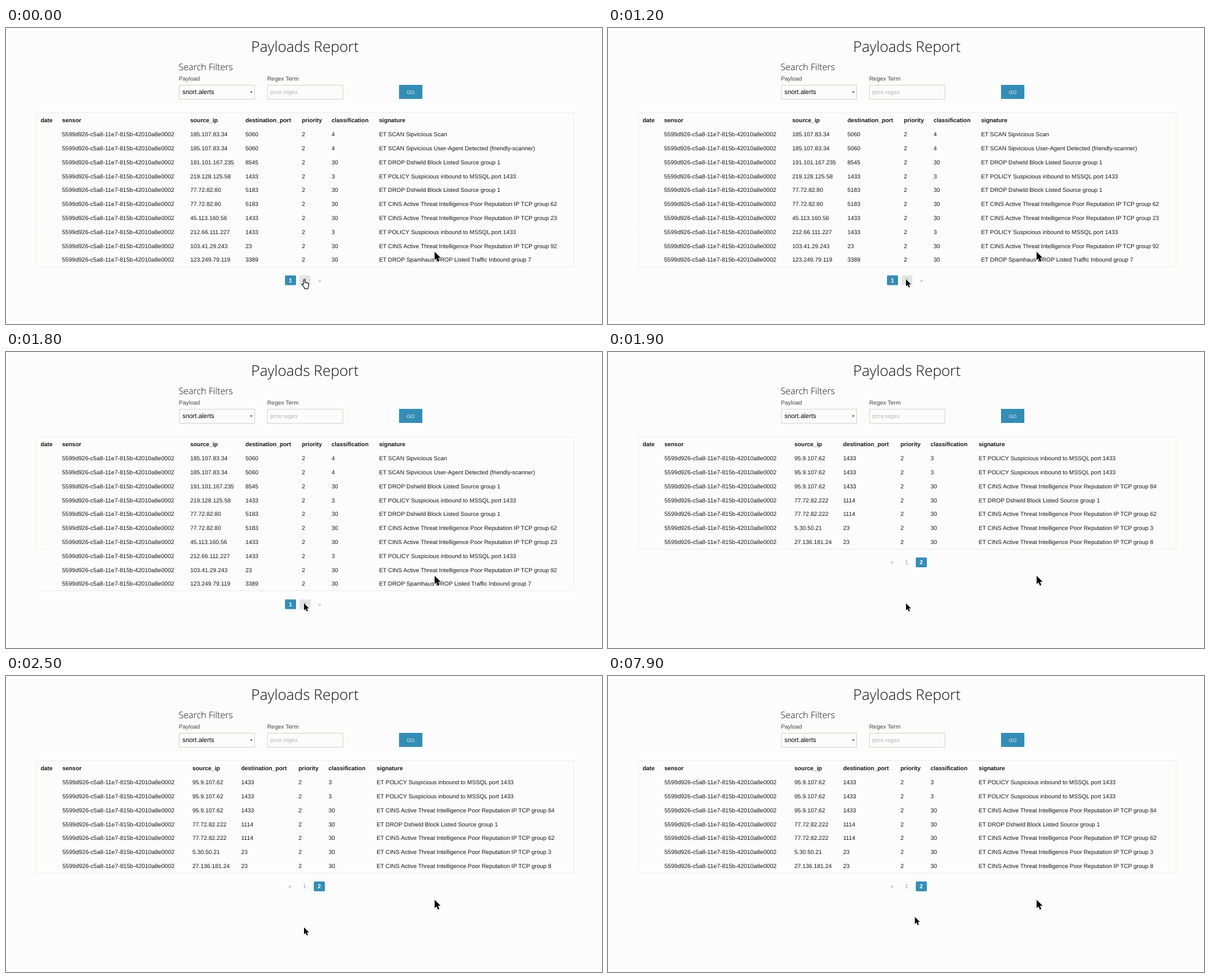
Recreate the animation shown at these times as an HTML page. Size 972 px wide and 484 px high, loop 8000 ms.

```html
<!DOCTYPE html>
<html lang="en">
<head>
<meta charset="utf-8">
<title>Payloads Report</title>
<style>
  html, body { margin: 0; width: 100%; height: 100%; overflow: hidden; background: #fcfcfc; }
  svg { display: block; width: 972px; height: 484px; }
  text { font: 9.5px "Liberation Sans", Arial, sans-serif; fill: #161616; text-rendering: geometricPrecision; white-space: pre; }
  .title { font: 300 24.1px "Open Sans", sans-serif; fill: #0c0c0c; }
  .sub { font: 300 14.75px "Open Sans", sans-serif; fill: #0c0c0c; }
  .label { fill: #444; }
  .select { font-size: 10.5px; fill: #000; }
  .hint { fill: #b4b4b4; }
  .go { font-size: 8px; fill: #eaf4f8; }
  .head { font-weight: bold; }
  .sensor { font-size: 9.65px; }
  .link { fill: #a2a2a0; }
  .on { font-weight: bold; fill: #fff; }
  .mid { text-anchor: middle; }
  .line { fill: none; stroke: #eeeede; }
  .field { fill: none; stroke: #d6d6cc; }
  .blue { fill: #358db6; }
  .hover { fill: #e4e4e4; }
  .cursor { fill: #050505; stroke: #fdfdfd; stroke-width: .8; stroke-linejoin: round; paint-order: stroke; }
</style>
</head>
<body>
<svg id="stage" viewBox="0 0 972 484">
  <defs>
    <path id="arrow" d="M0 0V13.6L3.2 10.7L5.4 15.9L7.7 14.9L5.5 9.8H9.8Z"/>
  </defs>
  <text class="title" x="399.8" y="38.5">Payloads Report</text>
  <text class="sub" x="281.5" y="69">Search Filters</text>
  <text class="label" x="282" y="86">Payload</text>
  <text class="label" x="426" y="86">Regex Term</text>
  <rect class="field" x="282.5" y="93.5" width="123" height="23"/>
  <text class="select" x="287.7" y="108.3">snort.alerts</text>
  <path d="M398 103.8h4l-2 2.2z" fill="#222"/>
  <rect class="field" x="426.5" y="93.5" width="123" height="23"/>
  <text class="hint" x="431" y="108">pcre regex</text>
  <rect class="blue" x="641" y="93" width="38" height="23"/>
  <text class="go mid" x="660" y="107.5">GO</text>
  <g id="page1"></g>
  <g id="page2"></g>
  <use href="#arrow" class="cursor" x="699" y="366"/>
  <use id="pointer" href="#arrow" class="cursor"/>
  <path id="hand" d="M485.2 419.5V413q0-1.6 1.2-1.6t1.2 1.6v3.4q1.4-.9 2.2.3 1.4-.7 2 .5 1.8-.5 1.8 1.4v2.6q0 2-1.2 3.4v1.9h-5.6v-1.8l-3.8-4.4q-.8-1.4.4-1.7 1 0 1.8.9z"
        fill="#fdfdfd" stroke="#111" stroke-width="1.1" stroke-linejoin="round"/>
</svg>
<script>
const LOOP = 8000;
const SENSOR = '5599d926-c5a8-11e7-815b-42010a8e0002';
const HEADS = ['date', 'sensor', 'source_ip', 'destination_port', 'priority', 'classification', 'signature'];
const SQL = 'ET POLICY Suspicious inbound to MSSQL port 1433';
const SHIELD = 'ET DROP Dshield Block Listed Source group 1';
const cins = n => 'ET CINS Active Threat Intelligence Poor Reputation IP TCP group ' + n;

// Row: source ip, port, classification, signature
const first = [
  ['185.107.83.34', 5060, 4, 'ET SCAN Sipvicious Scan'],
  ['185.107.83.34', 5060, 4, 'ET SCAN Sipvicious User-Agent Detected (friendly-scanner)'],
  ['191.101.167.235', 8545, 30, SHIELD],
  ['219.128.125.58', 1433, 3, SQL],
  ['77.72.82.80', 5183, 30, SHIELD],
  ['77.72.82.80', 5183, 30, cins(62)],
  ['45.113.160.56', 1433, 30, cins(23)],
  ['212.66.111.227', 1433, 3, SQL],
  ['103.41.29.243', 23, 30, cins(92)],
  ['123.249.79.119', 3389, 30, 'ET DROP Spamhaus DROP Listed Traffic Inbound group 7']
];
const second = [
  ['95.9.107.62', 1433, 3, SQL],
  ['95.9.107.62', 1433, 3, SQL],
  ['95.9.107.62', 1433, 30, cins(84)],
  ['77.72.82.222', 1114, 30, SHIELD],
  ['77.72.82.222', 1114, 30, cins(62)],
  ['5.30.50.21', 23, 30, cins(3)],
  ['27.136.181.24', 23, 30, cins(8)]
];

const $ = id => document.getElementById(id);

function add(parent, tag, attrs, content = '') {
  const el = document.createElementNS('http://www.w3.org/2000/svg', tag);
  for (const k in attrs) el.setAttribute(k, attrs[k]);
  el.textContent = content;
  parent.append(el);
  return el;
}

function table(page, rows, cols) {
  HEADS.forEach((h, i) => add(page, 'text', { class: 'head', x: cols[i], y: 154 }, h));
  rows.forEach(([ip, port, kind, sig], r) => {
    ['', SENSOR, ip, port, 2, kind, sig].forEach((v, i) => {
      if (v !== '') add(page, 'text', { class: i === 1 ? 'sensor' : '', x: cols[i], y: 177.2 + r * 22.8 }, v);
    });
  });
}

function pager(page, y, items) {
  items.forEach(([label, x, box]) => {
    if (box) add(page, 'rect', { class: box, x: x - 9, y: y - 8, width: 18, height: 16, rx: 1.5 });
    add(page, 'text', { class: 'mid ' + (box === 'blue' ? 'on' : 'link'), x, y: y + 3.4 }, label);
  });
}

table($('page1'), first, [56.5, 91.5, 300.5, 390.5, 482.5, 531, 608.5]);
add($('page1'), 'path', { class: 'line', d: 'M49.5 322.5V138.5H926.5V390.5H49.5' });
const leftEdge = add($('page1'), 'path', { class: 'line', d: 'M49.5 322.5V390.5' });
const stub = add($('page1'), 'path', { class: 'line', d: 'M49.5 322.5H64' });
pager($('page1'), 412.5, [['1', 464, 'blue'], ['2', 487.5, 'hover'], ['»', 511.5]]);

table($('page2'), second, [56.5, 92, 304, 383.5, 477, 526, 604.5]);
add($('page2'), 'path', { class: 'line', d: 'M49.5 138.5H926.5V322.5H49.5Z' });
pager($('page2'), 344, [['«', 463], ['1', 487], ['2', 511, 'blue']]);

const show = (el, on) => { el.style.display = on ? '' : 'none'; };

function draw(t) {
  show($('page1'), t < 1900);
  show($('page2'), t >= 1900);
  show(leftEdge, t < 1800);
  show(stub, t >= 1800);
  show($('hand'), t < 500);
  show($('pointer'), t >= 500);
  const [x, y] = t < 7900 ? [486, 411] : [500.5, 394];
  $('pointer').setAttribute('transform', `translate(${x} ${y}) scale(.84)`);
}

const start = performance.now();
function tick() {
  draw((performance.now() - start) % LOOP);
  requestAnimationFrame(tick);
}
tick();
</script>
</body>
</html>
```
